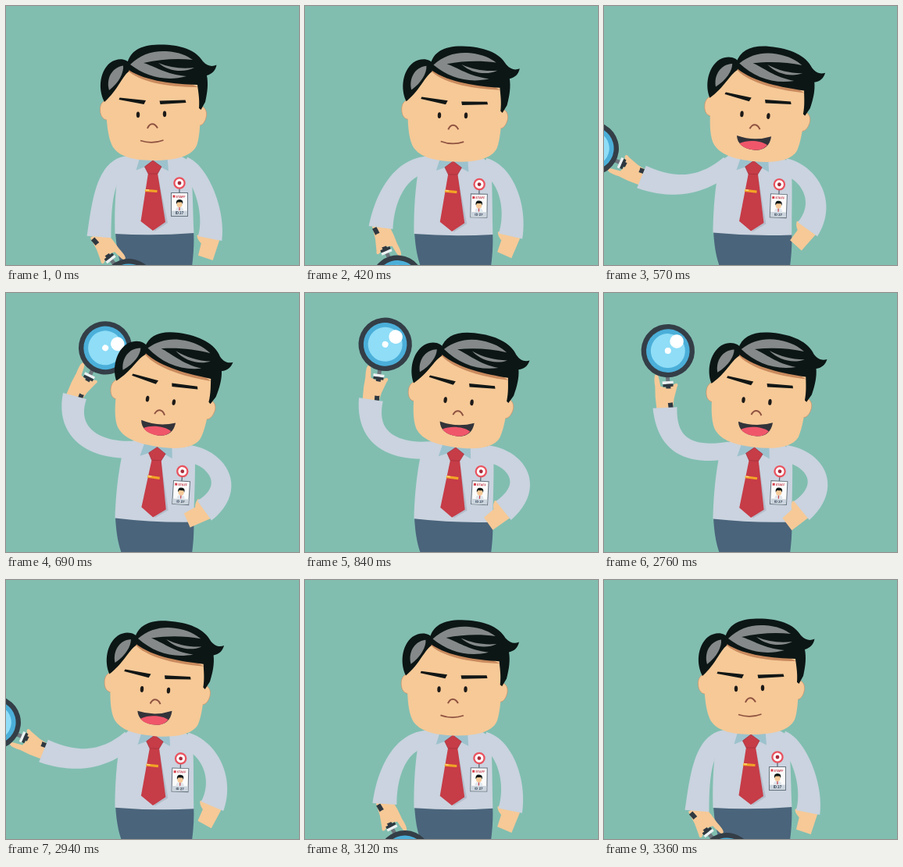
Animation of 375x332 px, one loop 4500 ms. Source, as an HTML page:

```html
<!DOCTYPE html>
<html lang="en">
<head>
<meta charset="utf-8">
<title>Clerk with magnifier</title>
<style>
  html, body { margin: 0; width: 100%; height: 100%; overflow: hidden; background: #81beb0; }
  svg { display: block; width: 100vw; height: 100vh; }
  text { font-family: Inter, sans-serif; font-weight: 700; }
</style>
</head>
<body>
<svg viewBox="0 0 375 332">
  <rect width="375" height="332" fill="#81beb0"/>
  <path fill="#4a647b" d="M140 288H240C241 304 240 318 238 334H148C143 320 141 306 140 288Z"/>

  <g id="leftHand">
    <path fill="#f6c997" d="M-10 5L-13-13L-14-26C-16-36-16-42-13-42C-10-42-9-34-7-27L3-25L11-31C14-33 16-31 14-27L11-12L10 5Z"/>
    <path d="M1-42L3-27" stroke="#6b747b" stroke-width="5"/>
    <path d="M2.5-29L8 2" stroke="#2f3840" stroke-width="6"/>
    <path d="M-5-31.5L9-33" stroke="#eef1f2" stroke-width="3.4"/>
    <path d="M-4-28L9-29.5" stroke="#2f3840" stroke-width="3.4"/>
    <path fill="#f6c997" d="M-9-24L9-25Q13-23 11-18L10-8Q8-5-8-7Z"/>
    <g transform="translate(0 -73)">
      <circle r="34.2" fill="#343e47"/>
      <circle r="27.8" fill="#4bafd9"/>
      <circle r="22" fill="#8fddf7"/>
      <circle cx="10.6" cy="-12.7" r="8.8" fill="#fff"/>
      <circle r="4" fill="#fff"/>
    </g>
  </g>
  <path id="leftArm" fill="#cad3df"/>

  <g id="torso">
    <path fill="#cad3df" d="M166 189C151 191 145 201 143 215C139 245 139 272 139.500 292Q190 295 240.500 291C239 262 239 220 236 202C230 193 218 190 208 189Z"/>
    <path fill="#9cc2cd" d="M172 192L166.500 210.500L181 205L188 198L195 205L208 211.500L206.500 193Z"/>
    <path fill="#b4bdcb" d="M195 220L207 278L190 289Z"/>
    <path fill="#c63c47" d="M182 214L172.500 276L188 288L204 277L194 214Z"/>
    <path fill="#c63c47" stroke="#a02f3b" stroke-width=".7" d="M188 198L177.500 206L182 215H194L199 206Z"/>
    <path d="M178 236.300L193.500 237.500" stroke="#f2a526" stroke-width="3.200"/>
    <path d="M178.500 235.600L183 236" stroke="#ffd884" stroke-width="1.300"/>
  </g>

  <g id="rightHand">
    <path fill="#f6c997" d="M-13-4L-17-1Q-16 4-10 8L-11 24L8.500 27L13-4Z"/>
  </g>
  <path id="rightArm" fill="#cad3df"/>

  <g id="badge">
    <path d="M222 233V240" stroke="#5b6873" stroke-width="1.300"/>
    <circle cx="222" cy="227" r="6.600" fill="#fff" stroke="#e9535f" stroke-width="2.300"/>
    <circle cx="222" cy="227" r="2.400" fill="#a92b3a"/>
    <rect x="211.500" y="239.500" width="21" height="30" fill="#fbfbfb" stroke="#66737e"/>
    <rect x="213.500" y="242.500" width="3" height="3" fill="#d63f4c"/>
    <text x="217.500" y="245.500" font-size="3.800" fill="#c23746">STAFF</text>
    <path fill="#dfe6ec" d="M217 262Q217 257.500 222 257.500T227 262Z"/>
    <ellipse cx="222" cy="254" rx="3.600" ry="4" fill="#f6c997"/>
    <path fill="#0c1615" d="M218 254Q217 248 222 248Q227.500 248 226 254L225 251.500H219.500Z"/>
    <path d="M222 258V262" stroke="#c63c47" stroke-width="1.200"/>
    <rect x="212" y="262.500" width="20" height="6.500" fill="#cbd4dd"/>
    <text x="222" y="267.300" font-size="4.200" text-anchor="middle" fill="#2f3f52">ID 27</text>
  </g>

  <g id="head">
    <g fill="#f6c997" stroke="#c9906a" stroke-width=".7">
      <path d="M131 120C123 121 120 127 120.500 134C121 142 125 147 132 146"/>
      <path d="M247 128C254 128 257.500 134 256.500 141C255 149 251 154 246 153"/>
    </g>
    <path fill="#f6c997" d="M150 78L128 116C128 148 130 169 137 181C146 194 165 198 190 198C218 198 238 192 244 179C248 168 250 145 248 98L200 68Z"/>
    <path fill="#c98a5d" d="M155 82C170 97 205 104 246 104L220 92Z"/>
    <g fill="#0c1615">
      <path d="M155 75C158 58 172 50 195 49.500C222 49 243 56 252 71C258 77.500 264 78 269.500 75.500C268 83 264 87 257 89C259 99 258 110 255 123L249.500 133L247 131C248 119 246 110 245 101C217 100 180 97 157 82Z"/>
      <path d="M126 123C118 108 119 85 133 73C143 66 154 67 160 75L157 84C148 91 143 108 126 123Z"/>
    </g>
    <g fill="#85898a">
      <path d="M132 108C128 95 134 79 150 76.500C151 85 145 98 132 108Z"/>
      <path d="M159 75C172 62 188 57 205 58C222 59 232 64 239 69C220 67 198 68 176 73C190 77 205 88 231 90C205 97 180 91 159 75Z"/>
      <path d="M195 73C210 79 225 81 241 79C228 86 208 84 195 73Z"/>
    </g>
    <g id="brows" fill="#111615">
      <path d="M145.500 117.500L179 121L176.500 126L144.500 120Z"/>
      <path d="M196.500 121.500L229.500 120.500L230.500 124L197.500 126Z"/>
    </g>
    <g fill="#1d1a18">
      <ellipse cx="169" cy="139.300" rx="2.200" ry="3.900"/>
      <ellipse cx="203" cy="138.300" rx="2.200" ry="3.900"/>
    </g>
    <path d="M181 157C184 149.500 190 149.500 194 156.500" fill="none" stroke="#8f5240" stroke-width="2"/>
    <path id="closed" d="M172 172.500Q187 177.500 201.500 172" fill="none" stroke="#8f5240" stroke-width="1.700"/>
    <g id="open">
      <path fill="#33343a" d="M165.500 167.500Q188 173 209.500 164C209 177 201 183.500 189 183.500C176 183.500 167 178 165.500 167.500Z"/>
      <path fill="#f0566a" d="M170 177C180 171 197 170.500 205.500 175.500C202 181 196 183.500 189 183.500C181 183.500 174 181.500 170 177Z"/>
    </g>
  </g>
</svg>

<script>
const LOOP = 4500, STEP = 30;
const $ = id => document.getElementById(id);

// head x, y, turn, brow lift | torso turn, drop |
// left arm: two controls, cuff, hand turn | right arm: the same
const rest  = [186, 138.5, 0, 0,  0, 0,  126, 205, 122, 255, 119, 296, -211.5,  248, 212, 268, 262, 261, 298, 10];
const lift  = [189, 140, 2.2, 1,  1, 1,  122, 205, 102, 245, 97, 284, -197,  255, 212, 272, 255, 263, 295, 15];
const swing = [191, 140.5, 4.4, 2,  1.5, 1,  130, 228, 95, 238, 48, 219, -60,  258, 214, 280, 252, 264, 290, 20];
const over  = [198, 137.5, 9.2, 7,  3.5, -.5,  112, 203, 76, 178, 88, 132, 32.4,  268, 210, 297, 248, 254, 279, 58];
const show  = [196.5, 138.5, 7.1, 7,  3, 0,  108, 205, 78, 184, 84, 137, 12.5,  268, 210, 296, 245, 254, 279, 45];
const leave = [195.5, 138.2, 6.4, 6.5,  2.8, 0,  105, 211, 80, 192, 78, 147, 3,  268, 211, 293, 246, 253, 279, 44];

const mix = (a, b, k) => a.map((v, i) => v + (b[i] - v) * k);
const rise = [...mix(swing, over, .35).slice(0, 6), ...swing.slice(6, 13), ...mix(swing, over, .35).slice(13)];

const keys = [
  [0, rest], [300, rest], [420, lift], [570, rise], [690, over],
  [840, mix(show, over, .1)], [1110, show], [2730, show], [2760, leave],
  [2940, swing], [3090, lift], [3270, mix(rest, lift, .07)], [3360, rest], [LOOP, rest]
];

const slope = (n, i) => (keys[n + 1][1][i] - keys[n][1][i]) / (keys[n + 1][0] - keys[n][0]);

// Monotone tangent: flat at holds and turning points
function tangent(n, i) {
  if (n === 0 || n === keys.length - 1) return 0;
  const a = slope(n - 1, i), b = slope(n, i);
  return a * b <= 0 ? 0 : 2 * a * b / (a + b);
}

function poseAt(t) {
  let n = 0;
  while (n < keys.length - 2 && t >= keys[n + 1][0]) n++;
  const [t0, a] = keys[n], [t1, b] = keys[n + 1];
  const d = t1 - t0, u = (t - t0) / d, u2 = u * u, u3 = u2 * u;
  return a.map((v, i) =>
    (2 * u3 - 3 * u2 + 1) * v + (3 * u2 - 2 * u3) * b[i] +
    d * ((u3 - 2 * u2 + u) * tangent(n, i) + (u3 - u2) * tangent(n + 1, i)));
}

// Sleeve outline: a cubic centre line that widens towards the cuff
function sleeve(x0, y0, [x1, y1, x2, y2, x3, y3]) {
  const near = [], far = [], count = 24;
  for (let k = 0; k <= count; k++) {
    const t = k / count, s = 1 - t;
    const at = (a, b, c, d) => s * s * s * a + 3 * s * s * t * b + 3 * s * t * t * c + t * t * t * d;
    const dir = (a, b, c, d) => s * s * (b - a) + 2 * s * t * (c - b) + t * t * (d - c);
    const x = at(x0, x1, x2, x3), y = at(y0, y1, y2, y3);
    const dx = dir(x0, x1, x2, x3), dy = dir(y0, y1, y2, y3);
    const w = (22 + 9 * t * t) / 2 / Math.hypot(dx, dy);
    near.push((x - dy * w).toFixed(2) + " " + (y + dx * w).toFixed(2));
    far.unshift((x + dy * w).toFixed(2) + " " + (y - dx * w).toFixed(2));
  }
  return "M" + near.concat(far).join("L") + "Z";
}

const move = (id, value) => $(id).setAttribute("transform", value);

function drawArm(side, x, y, turn, drop, arm) {
  const r = turn * Math.PI / 180, dx = x - 190, dy = y - 290;
  const sx = 190 + dx * Math.cos(r) - dy * Math.sin(r);
  const sy = 290 + drop + dx * Math.sin(r) + dy * Math.cos(r);
  $(side + "Arm").setAttribute("d", sleeve(sx, sy, arm));
  move(side + "Hand", `translate(${arm[4]} ${arm[5]}) rotate(${arm[6]})`);
}

function draw(t) {
  const p = poseAt(t);
  const [hx, hy, turn, brow, lean, drop] = p;
  move("head", `translate(${hx} ${hy}) rotate(${turn}) translate(-186 -138.5)`);
  move("brows", `translate(0 ${-brow})`);
  const body = `translate(0 ${drop}) rotate(${lean} 190 290)`;
  move("torso", body);
  move("badge", body);
  drawArm("left", 157, 203, lean, drop, p.slice(6, 13));
  drawArm("right", 228, 204, lean, drop, p.slice(13));
  const talking = t >= 510 && t < 3060;
  $("open").style.display = talking ? "" : "none";
  $("closed").style.display = talking ? "none" : "";
}

const start = performance.now();
function tick() {
  const t = (performance.now() - start) % LOOP;
  draw(Math.floor(t / STEP) * STEP);
  requestAnimationFrame(tick);
}
tick();
</script>
</body>
</html>
```
